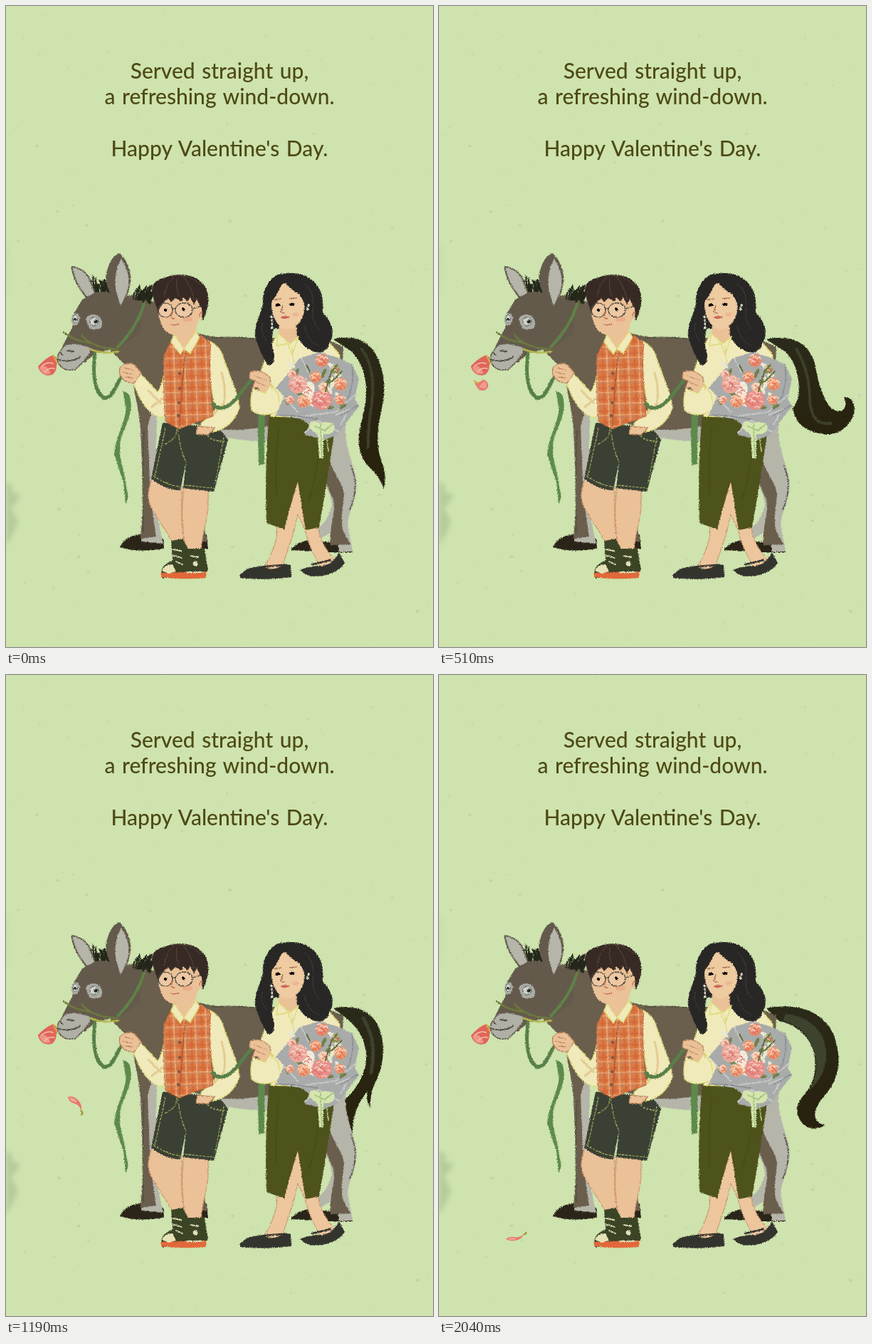
Write an HTML page that moves like this. It is 600x900 px and loops after 2210 ms.

```html
<!DOCTYPE html>
<html lang="en">
<head>
<meta charset="utf-8">
<title>Happy Valentine's Day</title>
<style>
html, body { margin: 0; width: 100%; height: 100%; overflow: hidden; background: #cee3ae; }
svg { display: block; width: 600px; height: 900px; }
text { font: 500 30px Lato, "Open Sans", sans-serif; word-spacing: 2px; text-anchor: middle; fill: #4e4a15; }
path, circle, ellipse { stroke-linecap: round; stroke-linejoin: round; }
.ln { fill: none; }
.fur { fill: #6a5e4d; }
.pale { fill: #b5b5aa; }
.skin { fill: #ebc198; }
.shirt { fill: #f0eabb; stroke: #dcda74; stroke-width: 1.3; }
.rein { fill: none; stroke: #587f48; stroke-width: 5; }
.frame { visibility: hidden; animation: show 2210ms step-end infinite;
  animation-delay: calc(var(--f) * 170ms - 2210ms); }
@keyframes show { 0% { visibility: visible; } 7.69231%, 100% { visibility: hidden; } }
</style>
</head>
<body>
<svg viewBox="0 0 600 900">
<defs>
  <filter id="rough" filterUnits="userSpaceOnUse" x="0" y="330" width="600" height="490" color-interpolation-filters="sRGB">
    <feTurbulence type="fractalNoise" baseFrequency=".8" numOctaves="2" seed="4"/>
    <feDisplacementMap in="SourceGraphic" scale="3.5" xChannelSelector="R" yChannelSelector="G"/>
  </filter>
  <filter id="soft" x="-50%" y="-50%" width="200%" height="200%"><feGaussianBlur stdDeviation="3"/></filter>
  <linearGradient id="hair" gradientUnits="userSpaceOnUse" x1="495" y1="470" x2="520" y2="610">
    <stop offset="0" stop-color="#2b2a1a"/><stop offset="1" stop-color="#28220e"/>
  </linearGradient>
  <pattern id="plaid" width="15" height="16" patternUnits="userSpaceOnUse" patternTransform="translate(224 468) rotate(-2)">
    <rect width="15" height="16" fill="#e07a42"/>
    <path d="M0 5H15M5 0V16" stroke="#c95d31" stroke-width="3" opacity=".6"/>
    <path d="M0 11H15M11 0V16" stroke="#f0c598" stroke-width="1.2"/>
    <path d="M0 14H15M14 0V16" stroke="#b08a72" stroke-width=".8"/>
  </pattern>

  <g id="rose">
    <path d="M60 498Q67 490 71 493L72 503 64 508Z" fill="#8aa04c"/>
    <path d="M67 490C72 499 73 511 66 517C56 522 47 515 45 506C50 501 57 493 67 490Z" fill="#df6659"/>
    <path d="M47 508C53 503 59 506 63 516Q52 520 47 508Z" fill="#f0958a"/>
    <path class="ln" d="M50 506Q58 499 66 502M55 514Q60 507 68 509" stroke="#f6bfae" stroke-width="1.5"/>
    <path class="ln" d="M67 491Q70 498 72 501" stroke="#e8a34a" stroke-width="2"/>
  </g>
  <g id="droop">
    <path d="M60 497Q66 490 71 493L72 502 64 506Z" fill="#8aa04c"/>
    <path d="M64 491C71 495 73 504 67 509L55 511 46 507Q54 499 64 491Z" fill="#e46c51"/>
    <path d="M49 509Q56 502 62 507L64 522Q56 526 51 523Z" fill="#ec7679"/>
    <path class="ln" d="M54 510L57 521M66 493L68 502" stroke="#d95357" stroke-width="1.5"/>
  </g>
  <g id="petal">
    <path d="M-9 -8Q-5 -2 4 -7Q11 -2 8 5Q2 11 -5 6Q-9 0 -9 -8Z" fill="#e67b70"/>
    <path d="M-4 3Q-2 -2 5 -4Q9 2 4 6Z" fill="#f09c90"/>
    <path class="ln" d="M-9 -8Q-7 -3 -3 -4" stroke="#d7a449" stroke-width="2"/>
  </g>
  <g id="curl">
    <path d="M-11 -4Q-5 4 1 2Q10 0 14 7Q8 13 -1 9Q-9 6 -11 -4Z" fill="#e77768"/>
    <path d="M0 5Q8 2 12 7Q6 10 0 7Z" fill="#f2a797"/>
    <path class="ln" d="M-11 -4Q-15 -5 -14 -9" stroke="#a3963c" stroke-width="2.6"/>
  </g>

  <g id="t0"><path d="M460 468C492 460 514 472 524 498C535 528 532 548 526 575C520 602 522 625 528 640C534 654 533 666 531 678C526 664 520 657 510 647C497 633 493 615 497 595C502 572 507 556 506 535C504 508 492 487 478 480Z"/>
    <path class="ln" d="M500 482Q520 510 514 555T509 620" stroke="#3f402a" stroke-width="4"/></g>
  <g id="t1"><path d="M460 468C496 460 520 474 530 503C538 532 536 560 538 585C542 614 558 630 577 626C570 650 552 664 532 656C508 646 498 622 499 596C506 568 508 552 506 532C502 506 492 487 478 480Z"/>
    <path class="ln" d="M502 482Q522 515 519 560T527 620" stroke="#3f402a" stroke-width="4"/></g>
  <g id="t2"><path d="M460 468C496 460 520 474 528 502C534 535 543 566 558 575C573 583 586 570 579 553C593 557 590 574 581 586C566 603 546 604 526 598C508 592 500 580 497 565C505 555 507 543 505 525C502 502 491 486 478 480Z"/>
    <path class="ln" d="M502 482Q520 510 521 550T553 588" stroke="#3f402a" stroke-width="4"/></g>
  <g id="t3"><path d="M460 468C496 460 520 474 528 502C534 535 543 561 555 567C568 573 575 563 569 549C585 549 588 568 578 583C565 603 546 604 526 598C508 592 500 580 497 565C505 555 507 543 505 525C502 502 491 486 478 480Z"/>
    <path class="ln" d="M502 482Q520 510 521 550T550 586" stroke="#3f402a" stroke-width="4"/></g>
  <g id="t4"><path d="M460 468C500 459 540 471 555 506C567 540 561 566 547 584C533 601 526 611 529 622C532 631 540 631 543 632C531 640 515 638 508 626C499 612 503 600 515 587C528 571 532 550 526 527C518 504 500 490 478 486Z"/>
    <path d="M486 476C515 478 538 494 543 522C548 548 537 568 520 584C530 567 533 548 527 527C518 503 502 490 484 486Z" fill="#3d432e"/></g>
  <g id="t5"><path d="M460 468C497 459 522 480 529 515C533 560 511 600 482 603Q470 604 466 596L474 480Z"/>
    <path d="M499 481C522 499 532 535 506 576Q493 570 492 545Z" fill="#3d412c"/></g>
  <g id="t6"><path d="M460 468C496 460 522 479 529 511C533 545 521 574 504 590C493 599 486 609 482 621Q465 613 468 599C492 585 505 560 504 532Q500 496 478 482Z"/>
    <path class="ln" d="M505 485Q529 525 507 570" stroke="#3f432d" stroke-width="6"/></g>
  <g id="t7"><path d="M460 468C496 460 522 476 528 508C533 535 527 556 520 570Q511 585 512 608Q505 597 508 584C494 602 486 620 487 646C477 637 470 616 471 601C495 580 508 557 506 530Q502 500 478 482Z"/>
    <path class="ln" d="M502 482Q522 514 513 558" stroke="#3f432d" stroke-width="5"/></g>
</defs>

<rect width="600" height="900" fill="#cee3ae"/>
<g id="paper"></g>
<g fill="#a9bf91" filter="url(#soft)" opacity=".65">
  <path d="M0 668L9 673 8 683 20 686 14 698 7 704 17 724 10 741 0 758Z"/>
  <path d="M0 332L5 340 3 400 0 410Z" opacity=".3"/>
</g>
<text x="300" y="102">Served straight up,</text>
<text x="300" y="138">a refreshing wind-down.</text>
<text x="300" y="211">Happy Valentine's Day.</text>

<g id="tails" fill="url(#hair)" filter="url(#rough)"></g>

<g filter="url(#rough)">
  <!-- donkey legs and body -->
  <path d="M160 760Q168 743 190 742L221 748 222 762Q185 768 160 760ZM254 745L282 742 284 762H256ZM400 764Q412 748 440 749L441 766ZM436 752L482 753 487 767H440Z" fill="#2b2519"/>
  <path class="pale" d="M185 540L213 545 211 620 212 715 221 755 190 752 194 690Z"/>
  <path class="fur" d="M178 520L206 565 199 590 203 690 211 745 189 748 193 690 189 590Z"/>
  <path class="fur" d="M274 690L280 740 284 752H264Z"/>
  <path class="pale" d="M440 588L478 580C473 612 485 632 492 663C496 690 482 706 480 728L487 766H468L463 735 436 752Z"/>
  <path class="fur" d="M440 645L456 640C460 658 473 668 475 686C474 704 469 718 474 738L484 756 456 757C453 736 464 712 460 694L448 665Z"/>
  <path d="M447 670Q437 700 440 732Q454 720 458 700Q456 684 447 670Z" fill="#cee3ae"/>
  <path class="pale" d="M292 575L372 580V611Q330 612 292 602Z"/>
  <path class="fur" d="M165 408C190 400 215 418 236 440C270 468 300 466 352 466L445 466 474 478 470 590 374 588Q340 598 292 594L212 572 190 570C176 545 183 526 172 508L143 480Z"/>
  <path class="ln" d="M290 466Q320 464 352 467M194 596Q191 650 193 740M484 645Q498 672 483 707" stroke="#514a3d" stroke-width="1.2"/>
  <g id="mane" class="ln" stroke="#24271a" stroke-width="2"></g>

  <!-- donkey head -->
  <path d="M92 366Q106 367 116 380L126 405 113 409Q96 389 92 366Z" class="pale" stroke="#615a4c" stroke-width="2"/>
  <path fill="#645a4c" d="M126 402C140 399 150 404 162 410L192 414 188 460 163 478C145 484 125 484 112 500L82 500 79 478 94 450 93 436 107 412Z"/>
  <path fill="#645a4c" d="M159 347C144 354 139 375 142 393Q149 414 160 424C169 414 176 395 175 379Q172 357 159 347Z"/>
  <path class="pale" d="M162 355C154 368 151 387 156 405L161 421C169 405 174 395 172 379Q168 363 162 355Z"/>
  <path d="M81 478C92 470 106 476 119 479L118 488Q109 500 98 510Q82 515 73 501C70 491 76 485 81 478Z" fill="#b0b0a6" stroke="#665e51" stroke-width="1.4"/>
  <path class="ln" d="M72 496Q88 502 104 493M86 484L95 485M77 487L79 490" stroke="#514c42" stroke-width="1.8"/>
  <path d="M112 439Q116 431 128 434Q138 441 134 452Q122 457 116 451ZM94 433Q101 428 104 438Q102 449 95 449Q89 440 94 433Z" fill="#a9aca3"/>
  <circle cx="124" cy="443" r="6" fill="#d4d6cd" stroke="#5f6664"/><circle cx="126" cy="443" r="2.6" fill="#252923"/>
  <ellipse cx="97" cy="439" rx="3.5" ry="5.5" fill="#d4d6cd" stroke="#5f6664"/><circle cx="97" cy="440" r="2" fill="#252923"/>
  <path class="ln" d="M81 458Q95 470 118 473M106 462Q120 480 156 482" stroke="#6c7a3c" stroke-width="2.5"/>
  <path class="ln" d="M194 418Q185 450 157 479" stroke="#5e8346" stroke-width="4"/>
  <path class="ln" d="M119 482Q135 489 158 485" stroke="#b3b64c" stroke-width="2.5"/>

  <!-- leads -->
  <path class="rein" d="M125 488C121 520 125 541 137 550C154 553 155 519 177 503"/>
  <path d="M164 540L173 545C180 566 171 584 163 602Q156 625 165 652L172 690 168 699 165 669 152 630C154 602 170 581 168 563Z" fill="#5d8a4b"/>

  <!-- boy -->
  <path class="skin" d="M205 665C199 680 198 690 203 702C210 717 227 738 236 758L252 758C247 735 246 715 247 676ZM250 676C246 705 247 728 252 765L274 768C275 740 285 718 284 698V676Z" stroke="#c98b60"/>
  <path d="M232 751L248 748 256 762 279 762 284 792 276 803 220 803Q213 788 234 778Z" fill="#3c4426"/>
  <path d="M218 796L282 794 281 803Q247 806 218 802Z" fill="#e2683a"/>
  <path d="M219 793Q222 784 234 784L239 794 229 797Z" fill="#e5e2b6"/>
  <path class="ln" d="M235 763L246 765M234 771L247 775M239 780L248 784M260 772L270 774M254 795H277" stroke="#dbddb6" stroke-width="1.8"/>
  <circle cx="266" cy="783" r="3.5" fill="#e2e2bb"/>
  <path d="M220 585L204 664Q225 680 245 680L253 640 249 677 292 682 312 609 299 592Z" fill="#3a4033"/>
  <path class="ln" d="M224 593L209 661M207 660Q227 673 245 675M242 596Q244 622 253 640M252 673L292 677M306 606L294 670M224 615Q240 608 240 594M278 594Q284 612 307 611" stroke="#a7ae5d" stroke-width="1.2" stroke-dasharray="3 2"/>
  <path class="shirt" d="M231 478C221 501 224 527 213 542L187 514 176 524C187 550 199 576 219 578Q233 567 236 535Z"/>
  <path class="shirt" d="M274 467Q299 472 305 492C312 516 326 541 328 565Q318 591 295 597L276 600 274 586 294 567 285 515Z"/>
  <path class="ln" d="M200 540L217 557M303 515Q310 539 306 558L292 573M205 563L219 552" stroke="#e3cb92" stroke-width="3"/>
  <path d="M233 469L259 486 274 462 288 474Q284 500 291 576L265 585 243 594 224 583Q220 530 222 491Z" fill="url(#plaid)" stroke="#c56735"/>
  <path class="ln" d="M252 487Q246 540 244 590" stroke="#a85231" stroke-width="1.3"/>
  <g fill="#815641"><circle cx="244" cy="516" r="2.2"/><circle cx="244" cy="537" r="2.2"/><circle cx="243" cy="557" r="2.2"/><circle cx="242" cy="575" r="2.2"/></g>
  <path class="skin" d="M235 447H268L264 470 250 482 238 467Z"/>
  <path class="shirt" d="M236 461L232 472 245 489 250 481ZM267 457L272 465 259 488 250 481Z"/>
  <path class="skin" d="M160 508Q169 498 181 504L190 515 180 530 168 527Q157 519 160 508ZM269 590L294 592 284 602 267 601Z" stroke="#b97f57" stroke-width="1.2"/>
  <path class="ln" d="M164 514L177 517M166 508L178 511M168 521L178 522" stroke="#b67a54"/>
  <path class="skin" d="M214 400H272L276 424Q281 436 271 441Q266 454 252 460Q237 466 225 457C214 446 212 425 214 400Z"/>
  <path d="M213 430C212 418 203 407 205 395Q209 384 225 381C240 374 264 377 275 388Q286 398 284 418Q282 432 276 442L275 424Q270 418 268 411L264 420 259 409 255 415 249 409 246 415 238 410 232 416 228 410 221 417Z" fill="#372a24"/>
  <path class="ln" d="M236 381Q225 388 222 409M249 380Q260 391 264 412M238 379Q256 375 274 392M240 383Q238 396 243 408" stroke="#5c4436"/>
  <circle cx="224" cy="427" r="10" fill="#fff" fill-opacity=".12" stroke="#444337" stroke-width="1.2"/>
  <ellipse cx="250" cy="427" rx="12" ry="10" fill="#fff" fill-opacity=".12" stroke="#444337" stroke-width="1.2"/>
  <path class="ln" d="M234 426Q236 423 238 426M262 425L274 421" stroke="#444337" stroke-width="1.2"/>
  <circle cx="224" cy="427" r="2.2"/><circle cx="249" cy="426" r="2.2"/>
  <path class="ln" d="M234 429L232 438 236 439M231 447Q237 449 243 446M276 429Q272 431 272 436" stroke="#bd694d" stroke-width="1.3"/>
  <ellipse cx="255" cy="440" rx="7" ry="3.5" fill="#e89d7b" opacity=".5"/>

  <!-- girl -->
  <path fill="#eec69d" d="M381 730Q382 759 363 787L386 794C394 767 403 748 410 714L420 735Q427 763 443 790L463 779Q441 756 438 730L409 662Z" stroke="#c49569"/>
  <path d="M329 798Q340 787 361 786Q375 796 391 783L400 785 401 802Q361 807 329 803ZM413 792Q428 785 445 786Q460 783 468 767L476 782Q466 797 440 801 422 802 413 792Z" fill="#34342e"/>
  <path class="ln" d="M363 787L387 785M430 784L456 778" stroke="#34342e" stroke-width="2.5"/>
  <path d="M370 574Q363 640 366 726L391 735Q399 703 410 668Q416 704 421 736L440 732Q451 670 460 608V576Z" fill="#4e521b"/>
  <path class="ln" d="M440 602Q440 650 425 695M383 590Q378 640 380 688" stroke="#464a14" stroke-width="1.3"/>
  <path class="shirt" d="M382 460Q365 488 358 514L376 535 372 576 462 579 469 490 444 460Z"/>
  <path class="rein" d="M291 559Q303 573 323 552L346 523"/>
  <path d="M356 534L364 542 363 643 355 645 354 600Z" fill="#5d8a4b"/>
  <path class="skin" d="M343 514Q359 508 371 522L372 541 361 546 353 535 346 537 350 526 342 523Z" stroke="#bc8960" stroke-width="1.2"/>
  <path class="ln" d="M349 519L366 526M351 528L364 533" stroke="#bc8960"/>
  <path class="shirt" d="M347 537L364 544 372 532 383 545 386 567Q363 580 345 568Q342 552 347 537Z"/>
  <path d="M398 375C376 374 364 389 361 410C362 431 348 443 350 464C355 478 357 488 368 504Q377 506 377 490Q371 474 376 453L406 452C408 468 420 484 440 487Q453 484 454 474C463 462 459 444 445 430C449 399 432 374 398 375Z" fill="#292725"/>
  <path class="skin" d="M384 449L408 446 409 466 398 476 383 462Z"/>
  <path d="M391 389C379 396 374 405 373 419Q374 441 387 451Q399 459 412 445Q422 432 419 410Q407 389 391 389Z" fill="#efcba1"/>
  <path d="M390 383Q384 404 371 417L368 390 399 376Q427 389 422 437Q420 413 411 404Q397 397 390 383Z" fill="#292725"/>
  <path class="ln" d="M420 390Q435 402 431 430Q430 445 441 455M361 445Q355 456 366 470M419 450Q424 472 439 477" stroke="#413d39"/>
  <path class="ln" d="M378 412L386 411M398 411L408 410M389 421L386 430 391 431" stroke="#9b6b4b" stroke-width="1.3"/>
  <ellipse cx="382" cy="420" rx="3.2" ry="2.2"/><ellipse cx="402" cy="419" rx="3.4" ry="2.2"/>
  <path d="M385 437Q391 434 399 436Q393 442 385 437Z" fill="#ca5f57"/>
  <ellipse cx="407" cy="433" rx="5" ry="3" fill="#e79b82" opacity=".4"/>
  <path class="ln" d="M373 436L374 452M425 420L423 429" stroke="#dadbc8" stroke-width="3" stroke-dasharray="1 4"/>
  <path class="shirt" d="M383 460L380 477 396 474 402 490 411 464 399 474Z"/>
  <path class="ln" d="M402 477L405 510M367 516Q372 530 374 538" stroke="#d5ce91"/>

  <!-- bouquet -->
  <path d="M412 495L440 486 464 493 486 503 496 523 490 552 496 562 482 580 466 602 448 609 420 602 426 588 415 580 379 574 391 548 379 536 398 514Z" fill="#a8abaa"/>
  <path class="ln" d="M381 573Q409 580 425 575L463 570 492 545M420 599L438 582 468 598M390 548L410 570M463 574L485 566M415 495L425 514M470 588L478 574" stroke="#c8cac8" stroke-width="2"/>
  <path class="ln" d="M379 574Q418 576 438 580M494 561L470 575M486 503Q490 530 480 552" stroke="#81878a" stroke-width="1.3"/>
  <g id="flowers"></g>
  <path d="M441 586Q426 577 426 592L438 602 440 635H446V601Q466 603 460 586L448 584Z" fill="#d5e6ad"/>
  <path class="ln" d="M442 588L444 635M434 590L448 596 458 588M450 602L453 625" stroke="#a5c284" stroke-width="1.8"/>
</g>

<g id="lids"></g>
<g id="roses"></g>

<defs>
  <path id="donkeyLid" d="M115 441Q122 433 132 438Q136 448 130 453Q121 455 116 450ZM92 439Q97 431 103 438Q102 449 94 448Z" fill="#a9aca3"/>
  <g id="peopleLids">
    <g fill="#ecc49b"><ellipse cx="224" cy="427" rx="5" ry="4"/><ellipse cx="249" cy="426" rx="5" ry="4"/></g>
    <g fill="#efcba1"><ellipse cx="382" cy="420" rx="5" ry="4"/><ellipse cx="402" cy="419" rx="5" ry="4"/></g>
    <path class="ln" d="M220 428Q224 431 228 428M245 427Q249 430 253 427M378 420Q382 423 386 420M398 419Q402 422 406 419" stroke="#3d302a" stroke-width="1.6"/>
  </g>
</defs>
</svg>
<script>
const $ = id => document.getElementById(id);
let seed = 17;
const rnd = () => (seed = seed * 16807 % 2147483647) / 2147483647;

function add(parent, tag, attrs) {
  const el = document.createElementNS('http://www.w3.org/2000/svg', tag);
  for (const key in attrs) el.setAttribute(key, attrs[key]);
  return $(parent).appendChild(el);
}

const show = (parent, id, f, transform = '') =>
  add(parent, 'use', { href: '#' + id, class: 'frame', style: `--f:${f}`, transform });

// Paper flecks
for (let i = 0; i < 420; i++) {
  const big = rnd() > .94;
  add('paper', 'ellipse', {
    cx: rnd() * 600, cy: rnd() * 900, rx: big ? 2.4 : .5 + rnd(), ry: big ? 1.8 : .5 + rnd() * .7,
    fill: rnd() > .3 ? '#aac48e' : '#dcebc2', opacity: .15 + rnd() * .35
  });
}

// Mane tufts
function tuft(x, y, width, rise, lean) {
  for (let i = 0; i < 36; i++) {
    const px = x + rnd() * width, py = y + rnd() * 10;
    add('mane', 'path', { d: `M${px} ${py}q${lean / 3} ${-rise / 2} ${lean + rnd() * 5} ${-rise * (.5 + rnd() * .6)}` });
  }
}
tuft(122, 398, 26, 21, -4);
tuft(178, 408, 28, 17, 3);

// Bouquet leaves and blooms
for (let i = 0; i < 30; i++) {
  const x = 393 + rnd() * 82, y = 504 + rnd() * 60;
  add('flowers', 'ellipse', { cx: x, cy: y, rx: 6, ry: 2.5, fill: i % 2 ? '#71804a' : '#e8e7d1', transform: `rotate(${rnd() * 180} ${x} ${y})` });
}
const blooms = [
  [402, 517, 6, '#edb49c'], [424, 537, 10, '#f3eedd'], [431, 553, 9, '#f3ead8'], [410, 531, 13, '#eaa79b'],
  [435, 521, 8, '#ee9465'], [444, 498, 9, '#e98b6c'], [418, 555, 9, '#efa070'], [444, 553, 14, '#e78f88'],
  [470, 531, 9, '#ed9a6b'], [469, 553, 7, '#ee966c'], [446, 535, 7, '#f0c3a0'], [399, 553, 6, '#eda986'], [463, 510, 6, '#87924e']
];
for (const [x, y, r, fill] of blooms) {
  add('flowers', 'circle', { cx: x, cy: y, r, fill });
  for (let i = 0; i < r * .8; i++) {
    const a = i * 2.4, d = r * Math.sqrt(i / r) * .9;
    const px = x + d * Math.cos(a), py = y + d * Math.sin(a);
    add('flowers', 'path', { class: 'ln', d: `M${px - 3} ${py}q3 -4 6 1`, stroke: i % 3 ? '#f8dccb' : '#dc6b62', 'stroke-width': 1.3 });
  }
}
add('flowers', 'path', { class: 'ln', d: 'M449 541L457 514 465 504M458 527L472 513M427 514L422 504', stroke: '#626b32', 'stroke-width': 2 });

[0, 1, 2, 3, 4, 5, 6, 7, 0, 7, 6, 5, 4].forEach((pose, f) => show('tails', 't' + pose, f));

for (const f of [4, 11]) show('lids', 'donkeyLid', f);
for (const f of [6, 10]) show('lids', 'peopleLids', f);

for (let f = 0; f < 13; f++)
  show('roses', f == 1 || f == 2 ? 'droop' : 'rose', f, f == 1 ? 'translate(0 -3)' : `rotate(${f % 2} 70 494)`);

// Falling petal: x, y, turn, vertical scale
const fall = [
  [60, 532, -12, 1], [60, 544, 0, 1], [67, 568, 24, .9], [84, 593, 35, .8],
  [97, 604, 205, .9], [103, 650, 55, .9], [93, 693, 0, .8], [89, 731, -25, .8],
  [104, 765, 180, -.8], [108, 788, 180, -.6]
];
fall.forEach(([x, y, turn, sy], i) =>
  show('roses', i < 3 ? 'petal' : 'curl', i + 3, `translate(${x} ${y}) rotate(${turn}) scale(1 ${sy})`));
</script>
</body>
</html>
```
